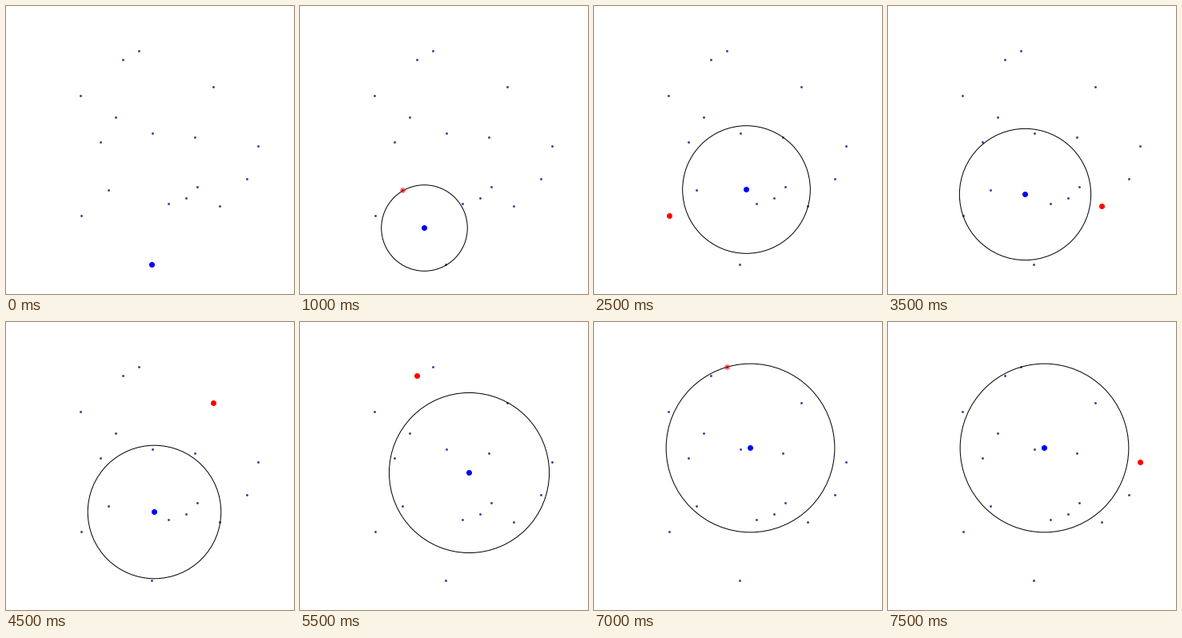
Animation of 360 by 360 pixels, one loop 8000 ms. Source, as a matplotlib script:

```python
import matplotlib.pyplot as plt
import numpy as np
from itertools import islice
from matplotlib.animation import FuncAnimation
from matplotlib.patches import Circle

SIZE, DPI = 360, 100
FRAMES, STEP = 16, 500

# scattered points in the order they are scanned
POINTS = np.array([
    (182.5, 323.5), (128.5, 230.5), (236.8, 164.5), (94.1, 262.5),
    (267.5, 250.5), (259.5, 101.05), (146.5, 67.05), (166.5, 56.5),
    (183.5, 159.5), (203.5, 247.5), (225.5, 240.5), (239.5, 226.5),
    (118.5, 170.5), (137.5, 139.5), (315.5, 175.5), (301.5, 216.5),
    (93.5, 112.5)])


def snap(pos):
    """Centre of the pixel that holds the position."""
    return np.floor(pos) + 0.5


def scan(points):
    """Bouncing bubble: yield (center, radius, probe, alpha) per picture."""
    center, radius = points[0], 0.0
    yield center, radius, center, 0
    for p in points[1:]:
        offset = p - center
        dist = np.hypot(*offset)
        if dist <= radius:
            continue
        yield center, radius, p, 1
        ratio = radius / dist
        center = center + offset * (1 - ratio**2) / 2
        radius = dist * (1 + ratio**2) / 2
        yield center, radius, p, 0.5


states = list(islice(scan(POINTS), FRAMES))

fig = plt.figure(figsize=(SIZE / DPI, SIZE / DPI), dpi=DPI, facecolor="white")
ax = fig.add_axes([0, 0, 1, 1])
ax.set_xlim(0, SIZE)
ax.set_ylim(SIZE, 0)
ax.axis("off")


def dot(pos, radius, color, z):
    return ax.add_patch(Circle(snap(pos), radius, fc=color, lw=0, zorder=z))


for p in POINTS:
    dot(p, 1.45, "#3f3d99", 1)

ring = ax.add_patch(Circle((0, 0), 1, fill=False, ec="black",
                           lw=72 / DPI, zorder=2))
middle = dot(POINTS[0], 3.5, "#0000ff", 3)
probe = dot(POINTS[0], 3.5, "#ff0000", 4)


def update(i):
    center, radius, point, alpha = states[i]
    ring.set_center(snap(center))
    ring.set_radius(radius)
    ring.set_visible(radius > 0)
    middle.set_center(snap(center))
    probe.set_center(snap(point))
    probe.set_alpha(alpha)
    return ring, middle, probe


anim = FuncAnimation(fig, update, frames=FRAMES, interval=STEP,
                     repeat=True, repeat_delay=0)
plt.show()
```
